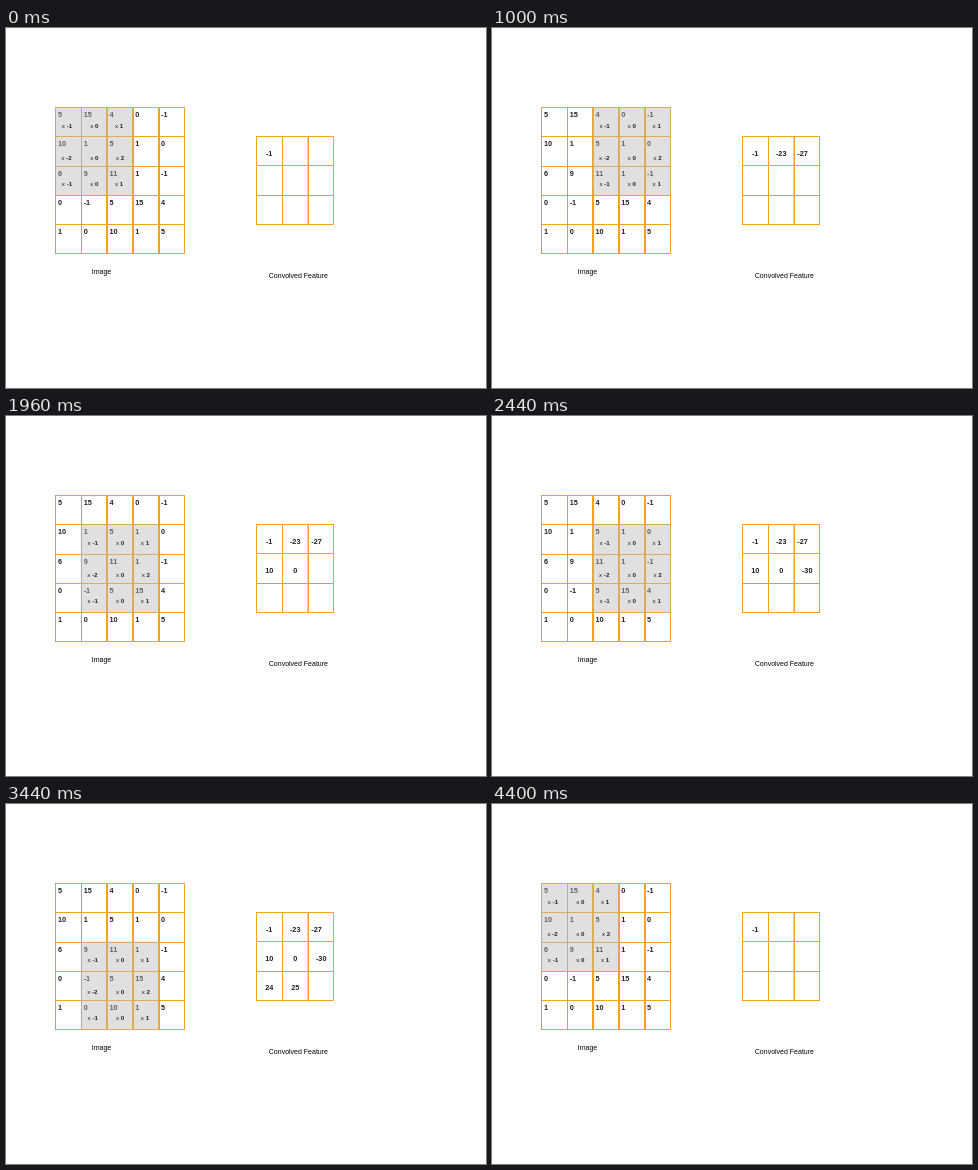
Animation of 480 by 360 pixels, one loop 4.44 s. Source, as an HTML page:

```html
<!DOCTYPE html>
<html lang="en">
<head>
<meta charset="utf-8">
<title>Convolution</title>
<style>
html, body { margin: 0; width: 100%; height: 100%; overflow: hidden; background: #fff; }
svg { display: block; width: 100%; height: 100%; }
text { font: 7px "Liberation Sans", Arial, sans-serif; fill: #000; white-space: pre; }
.num { font-size: 7.3px; font-weight: bold; fill: #222; }
.out { text-anchor: middle; }
.weight { font-size: 6.2px; fill: #222; }
.weight tspan { font-weight: bold; }
</style>
</head>
<body>
<svg id="stage" viewBox="0 0 480 360"></svg>
<script>
const LOOP = 4440;
const STARTS = [0, 520, 1000, 1480, 1960, 2440, 2960, 3440, 3920, 4400];
const IMAGE = [
  [5, 15, 4, 0, -1],
  [10, 1, 5, 1, 0],
  [6, 9, 11, 1, -1],
  [0, -1, 5, 15, 4],
  [1, 0, 10, 1, 5]
];
const KERNEL = [[-1, 0, 1], [-2, 0, 2], [-1, 0, 1]];
const RESULT = [-1, -23, -27, 10, 0, -30, 24, 25, -19];
const CELL_W = 25.8, CELL_H = 29.2;
const ORANGE = "#f7a21b", GRAY = "#a9a39b";
const stage = document.getElementById("stage");

function add(parent, tag, attrs, content) {
  const el = document.createElementNS("http://www.w3.org/2000/svg", tag);
  for (const key in attrs) el.setAttribute(key, attrs[key]);
  if (content !== undefined) el.textContent = content;
  parent.appendChild(el);
  return el;
}

function bar(x, y, width, height, fill) {
  add(stage, "rect", { x, y, width, height, fill });
}

// Lines are [position, thickness, colour].
function grid(cols, rows) {
  const left = cols[0][0], top = rows[0][0];
  const [right, rightW] = cols[cols.length - 1];
  const [bottom, bottomH] = rows[rows.length - 1];
  for (const [y, h, color] of rows) bar(left, y, right + rightW - left, h, color);
  for (const [x, w, color] of cols) bar(x, top, w, bottom + bottomH - top, color);
}

grid(
  [[49, 1, GRAY], [75, 1, GRAY], [100, 2, ORANGE], [126, 2, ORANGE], [152, 2, ORANGE], [178, 1, ORANGE]],
  [79, 108, 138, 167, 196, 225].map(y => [y, 1, ORANGE])
);
grid(
  [[250, 1, ORANGE], [276, 1, ORANGE], [301.5, 1.5, ORANGE], [327, 1, ORANGE]],
  [[108, 1, ORANGE], [137, 1, ORANGE], [167, 1, GRAY], [196, 1, ORANGE]]
);

IMAGE.forEach((row, r) => row.forEach((n, c) =>
  add(stage, "text", { class: "num", x: 51.9 + c * CELL_W, y: 89.2 + r * CELL_H }, n)));

const mask = add(stage, "g", {});
add(mask, "rect", { x: 49, y: 79, width: 78, height: 88.5, fill: "#b8b8b8", "fill-opacity": 0.43 });
KERNEL.forEach((row, r) => row.forEach((n, c) => {
  const x = [55.8, 84.2, 109][c] + (r === 1 ? [-0.4, 0, 0.9][c] : 0);
  const label = add(mask, "text", { class: "weight", x, y: [100.1, 132, 158][r] }, "x ");
  add(label, "tspan", {}, n);
}));

const results = RESULT.map((n, i) => {
  const x = i === 2 ? 310.5 : [263.2, 289.2, 315.2][i % 3];
  const y = 128 + Math.floor(i / 3) * 29;
  return add(stage, "text", { class: "num out", x, y }, n);
});

add(stage, "text", { x: 85.8, y: 246 }, "Image");
add(stage, "text", { x: 262.8, y: 250 }, "Convolved Feature");

function render(time) {
  const t = time % LOOP;
  const step = STARTS.filter(start => start <= t).length - 1;
  const i = step % 9;
  const dx = (i % 3) * CELL_W, dy = Math.floor(i / 3) * CELL_H;
  mask.setAttribute("transform", `translate(${dx} ${dy})`);
  results.forEach((el, k) => el.setAttribute("visibility", k <= i ? "visible" : "hidden"));
}

const begin = performance.now();
function tick() {
  render(performance.now() - begin);
  requestAnimationFrame(tick);
}
tick();
</script>
</body>
</html>
```
